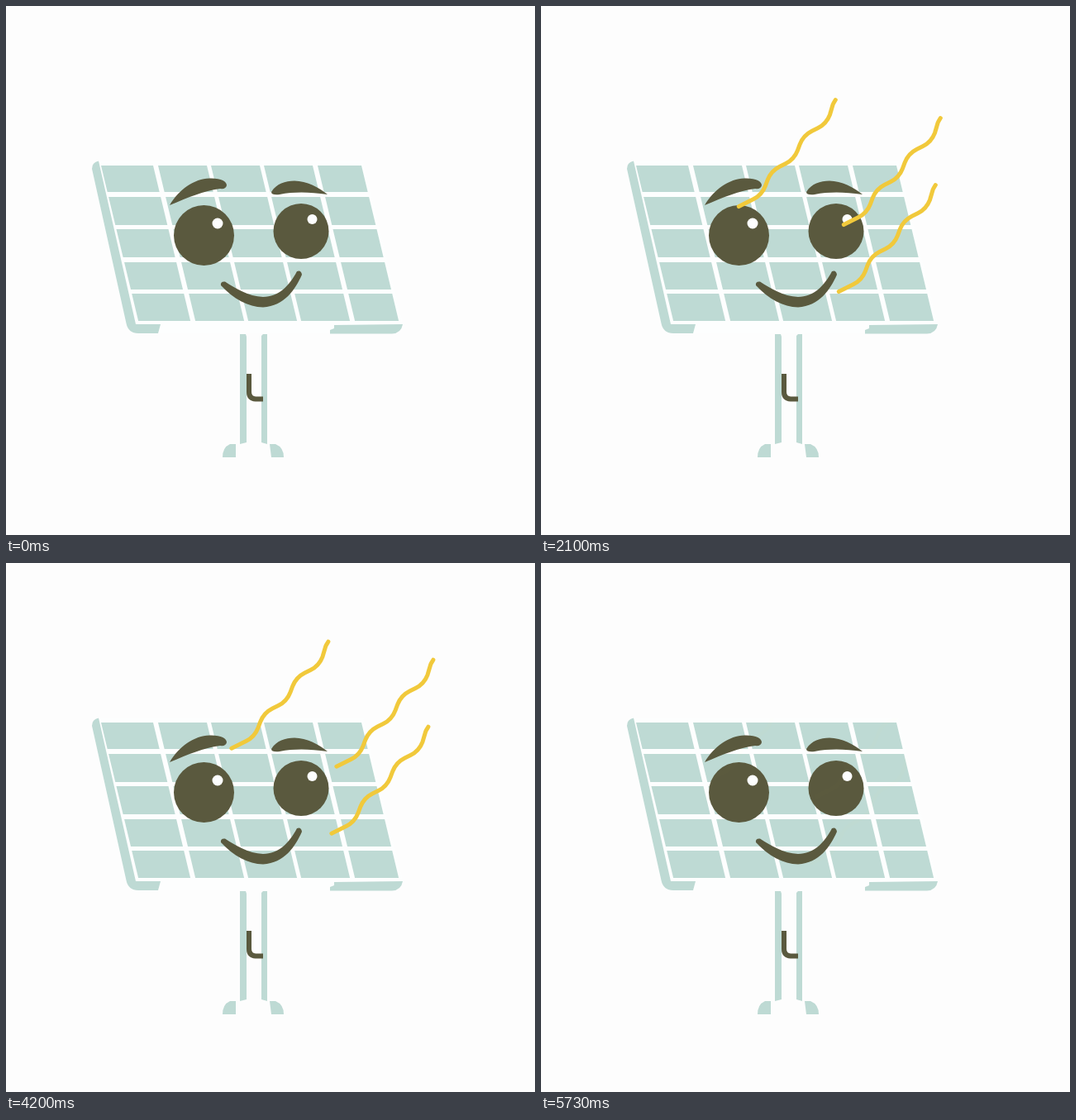
An HTML page with a canvas for the animation above (5810 ms loop, 640 by 640 pixels).

```html
<!DOCTYPE html>
<html lang="en">
<head>
<meta charset="utf-8">
<title>Solar panel</title>
<style>
html, body { margin: 0; width: 100%; height: 100%; overflow: hidden; background: #fdfdfd; }
canvas { display: block; }
</style>
</head>
<body>
<canvas width="640" height="640"></canvas>
<script>
const ctx = document.querySelector('canvas').getContext('2d');
const MINT = '#bedad4', DARK = '#5a593e', YELLOW = '#f1c93b', WHITE = '#fdfefe';
const LOOP = 5810, SECOND = 2875;

const panel = new Path2D('M112 187 H432 L480 385 L468 396 H160 Q148 396 145 383 L104 197 Q104 189 112 187Z');
const mintShapes = new Path2D(
  'M112 187.5 L157 385 H187 L184 396 H160 Q148 396 145.5 384 L104 197 Q104 189 112 187.5Z' +
  'M397 386 L480 385 Q478 396 467 396.5 H392 V392 L397 390Z' +
  'M283 397 H290 L291 400 V528 L283 530Z M309 399 L311 397 H316 V530 L309 528Z' +
  'M278 530 H271 Q262 534 262 546 H278Z M319 530 H326 Q336 534 336 546 H321Z');
const face = new Path2D(
  'M198 241 C209 222 228 209 246 208.5 C260 208 267 212 267 217 Q266 222 259 221 C238 224 222 231 198 241Z' +
  'M321 225 C327 215 338 211.5 349 211.5 C364 212 378 219 389 228 C367 225 349 224.5 331 228 Q321 229 321 225Z' +
  'M260 338 C275 354 293 364.5 311 364.5 C337 363 350 343 358 325 Q357 319 352 321 C343 338 330 352 311 352 C293 351 278 342 265 333.5 Q259 333 260 338Z');
const arm = new Path2D('M294 445 V467 Q294 475 302 475.5 H311');

function fill(path, color) {
  ctx.fillStyle = color;
  ctx.fill(path);
}

function disc(x, y, r, color) {
  ctx.fillStyle = color;
  ctx.beginPath();
  ctx.arc(x, y, r, 0, Math.PI * 2);
  ctx.fill();
}

function drawCells() {
  const columns = [[115, 178], [184, 243], [248, 307], [312, 371], [377, 430]];
  const rows = [[193, 225], [231, 265], [270, 304], [310, 343], [348, 381]];
  const slant = (x, y) => x + 0.24 * (y - 193);
  ctx.fillStyle = MINT;
  ctx.beginPath();
  for (const [top, bottom] of rows) {
    for (const [left, right] of columns) {
      ctx.moveTo(slant(left, top), top);
      ctx.lineTo(slant(right, top), top);
      ctx.lineTo(slant(right, bottom), bottom);
      ctx.lineTo(slant(left, bottom), bottom);
      ctx.closePath();
    }
  }
  ctx.fill();
}

function drawPanel() {
  fill(panel, WHITE);
  drawCells();
  fill(mintShapes, MINT);
  fill(face, DARK);
  disc(239.5, 277.5, 36.5, DARK);
  disc(357, 272.5, 33.5, DARK);
  disc(256, 263, 6.5, WHITE);
  disc(370.5, 258, 6, WHITE);
  ctx.strokeStyle = DARK;
  ctx.lineWidth = 6;
  ctx.lineCap = 'butt';
  ctx.stroke(arm);
}

// A wavy line of rounded zigzags, drawn upwards from its lower end.
function ray(x, y) {
  ctx.beginPath();
  ctx.moveTo(x, y);
  for (let i = 0; i < 3; i++) {
    ctx.arcTo(x + 28, y - 14, x + 39, y - 43, 30);
    x += 39;
    y -= 43;
    if (i < 2) ctx.arcTo(x, y, x + 28, y - 14, 30);
  }
  ctx.arcTo(x - 3, y + 5, x, y, 10);
  ctx.lineTo(x, y);
  ctx.stroke();
}

function drawRays(time) {
  const second = time >= 2940;
  const t = second ? time - SECOND : time;
  const on = second ? 765 : 725, off = 2480, end = 2865;
  if (t < 130 || t >= end) return;

  ctx.save();
  // Weak rays show only on the panel; strong ones show everywhere.
  if (t < on || t >= off) {
    ctx.clip(panel);
    ctx.globalAlpha = 0.35 * (t < on ? (t - 130) / (on - 130) : (end - t) / (end - off));
  }
  ctx.strokeStyle = YELLOW;
  ctx.lineWidth = 5;
  ctx.lineCap = 'round';
  const left = 1570 - t;
  const x = 262.3 + 0.0433 * left, y = 230 - 0.0236 * left;
  ray(x, y);
  ray(x + 127, y + 22);
  ray(x + 121, y + 103);
  ctx.restore();
}

const start = performance.now();
function draw() {
  ctx.fillStyle = '#fdfdfd';
  ctx.fillRect(0, 0, 640, 640);
  drawPanel();
  drawRays((performance.now() - start) % LOOP);
  requestAnimationFrame(draw);
}
draw();
</script>
</body>
</html>
```
